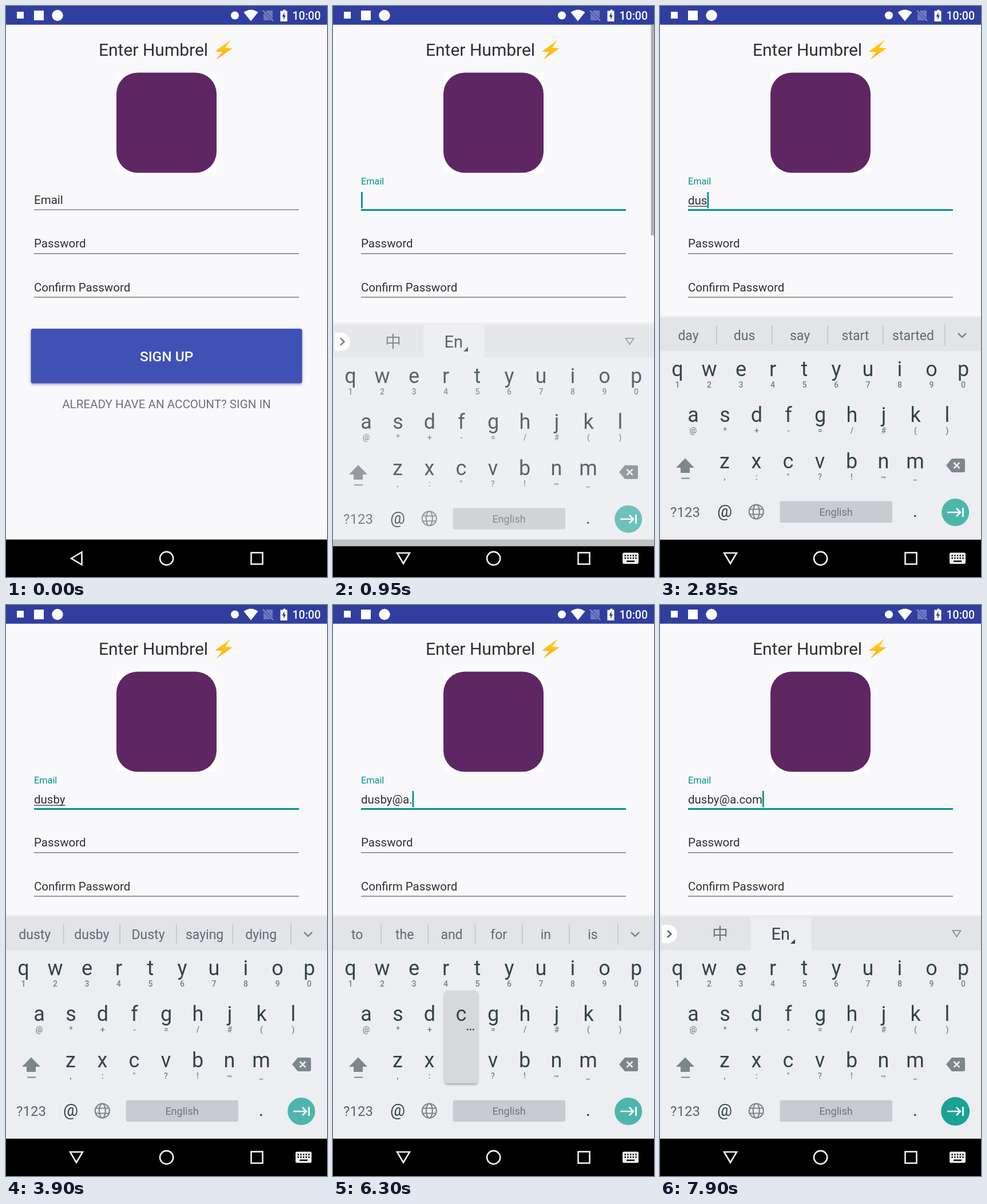
Animation of 561 by 998 pixels, one loop 8 s. Source, as an HTML page:

```html
<!DOCTYPE html>
<html lang="en">
<head>
<meta charset="utf-8">
<title>Sign up form</title>
<style>
html, body { margin: 0; width: 100%; height: 100%; overflow: hidden; background: #f9f8fb; }
svg { display: block; width: 100vw; height: 100vh; font-family: Roboto, "Noto Sans", sans-serif; }
.mid { text-anchor: middle; }
.form { font-size: 20.5px; fill: #303032; }
.key { font-size: 36px; fill: #35444b; text-anchor: middle; }
.sub { font-size: 14px; font-weight: 500; fill: #748087; text-anchor: middle; }
.word { font-size: 23px; fill: #5d6b72; text-anchor: middle; }
.line { fill: none; stroke-width: 2.6; }
</style>
</head>
<body>
<svg id="stage" viewBox="0 0 561 998" preserveAspectRatio="none">
  <defs>
    <filter id="drop" x="-10%" y="-10%" width="120%" height="130%">
      <feDropShadow dx="0" dy="2" stdDeviation="2" flood-opacity=".35"/>
    </filter>
    <linearGradient id="gold" x1="0" y1="0" x2="0" y2="1">
      <stop offset="0" stop-color="#ffd21c"/><stop offset="1" stop-color="#ffac12"/>
    </linearGradient>
    <linearGradient id="edge" x1="0" y1="0" x2="0" y2="1">
      <stop offset="0" stop-opacity="0"/><stop offset="1" stop-opacity=".09"/>
    </linearGradient>
  </defs>
  <rect width="561" height="998" fill="#f9f8fb"/>

  <!-- status bar -->
  <rect width="561" height="32.700" fill="#303f9f"/>
  <g fill="#fff">
    <rect x="19" y="10" width="12" height="12"/>
    <rect x="49" y="8" width="17" height="17"/>
    <circle cx="90" cy="16.500" r="9.700"/>
    <circle cx="400" cy="16.500" r="7"/>
    <path d="M415.500 11Q428 2 440.500 11L428 26.500Z"/>
    <path d="M482 8.500H484.500V6.500H488.500V8.500H491.500V27H479.500V8.500Z"/>
    <text x="550" y="24" font-size="19.500" font-weight="500" text-anchor="end">10:00</text>
  </g>
  <path d="M486.500 11L482.500 18.500H485V24L489 16.500H486.500Z" fill="#303f9f"/>
  <path d="M466 8V25H450V13L455 8Z" fill="#6d78bb"/>
  <path d="M449 8L467 26" stroke="#303f9f" stroke-width="4"/>
  <path d="M449 8L467 26" stroke="#8790c7" stroke-width="2"/>

  <!-- form -->
  <text x="162" y="87" font-size="30" fill="#303032">Enter Humbrel</text>
  <path d="M393 59L365 79.500L378 80.500L367 94L396 74L383 73Z" fill="url(#gold)"/>
  <rect x="193" y="116.500" width="175" height="175" fill="#fff"/>
  <rect x="193" y="116.500" width="175" height="175" rx="37" fill="#5e2764"/>
  <text id="label" x="49">Email</text>
  <rect id="rule" x="49" width="463"/>
  <g class="form">
    <text id="entry" x="49" y="347"></text>
    <text x="49" y="422">Password</text>
    <text x="49" y="499">Confirm Password</text>
  </g>
  <rect id="under" x="49" y="349.500" height="1.300" fill="#303032"/>
  <rect id="caret" y="325" width="2.800" height="28.500" fill="#009688"/>
  <path d="M49 432.700H512M49 509H512" stroke="#7c7b7e" stroke-width="1.400"/>
  <rect x="43.500" y="564" width="474" height="95.500" rx="4" fill="#3f51b5" filter="url(#drop)"/>
  <text class="mid" x="280.700" y="621" font-size="24.500" font-weight="500" fill="#fff">SIGN UP</text>
  <text class="mid" x="280.500" y="703" font-size="20.600" fill="#727174">ALREADY HAVE AN ACCOUNT? SIGN IN</text>
  <rect id="cover" y="546" width="561" height="387" fill="#f9f8fb"/>
  <rect id="bar" x="555.500" y="33" width="5.500" height="368" fill="#b1b0b3"/>
  <rect y="932.500" width="561" height="65.500" fill="#000"/>

  <!-- keyboard -->
  <g id="board">
    <rect y="540" width="561" height="6" fill="url(#edge)"/>
    <rect y="546" width="561" height="386.500" fill="#eceef1"/>
    <rect y="546" width="561" height="57" fill="#e2e4e7"/>
    <g id="tools">
      <rect x="158.500" y="546" width="106" height="57" fill="#eceef1"/>
      <path d="M3 559H14A16 16 0 0 1 14 591H3Z" fill="#fff"/>
      <path class="line" d="M13 569L19.500 575L13 581" stroke="#5a666c"/>
      <text class="mid" x="105" y="585" font-size="28" fill="#667379" style="font-family:'Noto Sans CJK SC','Noto Sans CJK',sans-serif">中</text>
      <text x="194.500" y="585" font-size="29" fill="#35444b">En</text>
      <path d="M236 584V592H228Z" fill="#35444b"/>
      <path d="M511.500 569H525.500L518.500 580Z" fill="none" stroke="#7c868b" stroke-width="1.600"/>
    </g>
    <g id="words"></g>
    <g id="keys"></g>
    <g fill="#7c868b">
      <path d="M44 790.500L60 807H52V816H36V807H28Z"/>
      <rect x="37" y="824.500" width="15" height="2"/>
      <path d="M500 803L510 791H530Q533 791 533 794V812Q533 815 530 815H510Z"/>
    </g>
    <path d="M513.500 798L523.500 808M523.500 798L513.500 808" stroke="#eceef1" stroke-width="2.600"/>
    <text class="mid" x="44" y="893" font-size="24" fill="#59666d">?123</text>
    <g fill="none" stroke="#7c868b" stroke-width="2.200">
      <circle cx="168.300" cy="884" r="12.500"/>
      <ellipse cx="168.300" cy="884" rx="5.500" ry="12.500"/>
      <path d="M157 879.500H180M157 888.500H180"/>
    </g>
    <rect x="209.500" y="865.500" width="196.500" height="37.500" rx="3.500" fill="#c8cbcf"/>
    <text class="mid" x="307.500" y="891" font-size="18" fill="#6c767b">English</text>
    <circle id="enter" cx="516.200" cy="885"/>
    <path class="line" d="M502 885H524M518 878L525 885L518 892M529.500 877V893" stroke="#fff"/>
  </g>
  <g id="pop">
    <rect x="-28.500" y="-41" width="57" height="162" rx="5" fill="#d6d8da" filter="url(#drop)"/>
    <text id="popKey" class="key" y="12"></text>
    <path id="dots" d="M10 27H23" stroke="#35444b" stroke-width="2.400" stroke-dasharray="2.600 2.400"/>
  </g>

  <!-- navigation bar -->
  <g class="line" stroke="#f2f2f2">
    <path id="back" d="M-9 0L9.500 -11V11Z"/>
    <circle cx="280.600" cy="965.500" r="11.600"/>
    <rect x="428.500" y="955.500" width="20" height="20"/>
  </g>
  <g id="imeIcon">
    <rect x="506" y="955.500" width="28" height="19.500" rx="2.500" fill="#f2f2f2"/>
    <path d="M509.500 960.500H531M509.500 965H531" stroke="#000" stroke-width="2.400" stroke-dasharray="2.400 2.300"/>
    <path d="M513 970.500H527" stroke="#000" stroke-width="2.400"/>
  </g>
</svg>
<script>
const LOOP = 8000;
const $ = id => document.getElementById(id);
const set = (el, attrs) => { for (const k in attrs) el.setAttribute(k, attrs[k]); return el; };
const show = (el, on) => el.style.display = on ? '' : 'none';
const add = (parent, tag, attrs, text = '') => {
  const el = set(document.createElementNS('http://www.w3.org/2000/svg', tag), attrs);
  el.textContent = text;
  return parent.appendChild(el);
};
const clamp = v => Math.max(0, Math.min(1, v));
const phase = (t, from, to) => clamp((t - from) / (to - from));
const mix = (a, b, p) => a + (b - a) * p;

// keys: letters, hints, first x, baseline
const STEP = 55.5, ROWS = [
  ['qwertyuiop', '1234567890', 30.5, 647],
  ['asdfghjkl', '@*+-=/#()', 58, 727],
  ['zxcvbnm', ',:"?!~_', 113, 808]
];
const spots = { '@': [113, 888.5], '.': [446, 888.5] };
for (const [letters, hints, x0, y] of ROWS) {
  [...letters].forEach((c, i) => {
    const x = x0 + STEP * i;
    spots[c] = [x, y];
    add($('keys'), 'text', { class: 'key', x, y }, c);
    add($('keys'), 'text', { class: 'sub', x, y: y + 20 }, hints[i]);
  });
}
for (const [c, size] of [['@', 29], ['.', 32]])
  add($('keys'), 'text', { class: 'key', x: spots[c][0], y: 893, style: `font-size:${size}px` }, c);

// key, press, text commit, release
const TAPS = [
  ['d', 2150, 2200, 2300], ['u', 2500, 2600, 2650], ['s', 2700, 2800, 2850],
  ['b', 3050, 3200, 3250], ['y', 3300, 3400, 3500], ['@', 4600, 4700, 4800],
  ['a', 5600, 5700, 5800], ['.', 6050, 6200, 6250], ['c', 6300, 6400, 6450],
  ['o', 6500, 6600, 6650], ['m', 6700, 6800, 6950]
];
// start, cell width, suggestions (none: tool strip)
const STRIPS = [
  [0, 0, ''], [2250, 97, 'do day did down does'], [2600, 97, 'due du dust during duty'],
  [2800, 97, 'day dus say start started'], [3200, 98.6, 'dust dusb Dusty busy days'],
  [3400, 98.6, 'dusty dusby Dusty saying dying'], [4700, 0, ''],
  [6200, 82.2, 'to the and for in is'], [6400, 0, '']
];
const CARET = [[800, 1250], [1750, 3900], [4400, 5150], [5600, 7350], [7850, LOOP]];

let strip;
function drawStrip(next) {
  if (next === strip) return;
  strip = next;
  const [, cell, list] = strip, box = $('words');
  box.replaceChildren();
  show($('tools'), !list);
  if (!list) return;
  const words = list.split(' ');
  let left = 0;
  words.forEach((w, i) => {
    const right = i < words.length - 1 ? 2 + cell * (i + 1) : 498;
    const last = right === 498;
    add(box, 'text', { class: 'word', x: (left + right) / 2 - (last ? 1.5 : 0), y: 584 }, w);
    add(box, 'path', { d: `M${right} ${last ? 556 : 558}V${last ? 594 : 592}`, stroke: '#c0c5c8', 'stroke-width': 1.6 });
    left = right;
  });
  add(box, 'path', { class: 'line', d: 'M521 572L528 579L535 572', stroke: '#7c868b' });
}

function render(t) {
  // field focus
  const focus = t >= 750, lift = phase(t, 750, 930);
  set($('label'), { y: mix(346, 312, lift), 'font-size': mix(20.5, 16.3, lift), fill: focus ? '#009688' : '#303032' });
  set($('rule'), focus ? { y: 355, height: 3, fill: '#009688' } : { y: 355.3, height: 1.4, fill: '#7c7b7e' });

  // keyboard entry
  const up = t >= 850, rise = phase(t, 850, 1080);
  show($('board'), up);
  show($('cover'), up);
  show($('imeIcon'), up);
  set($('board'), { transform: `translate(0 ${66.5 * (1 - rise) ** 3})`, opacity: clamp(rise * 1.85) });
  set($('back'), { transform: `translate(123 965.500) rotate(${up ? -90 : 0})` });
  show($('bar'), up);
  set($('bar'), { opacity: 1 - phase(t, 1580, 1830) });

  // typing
  const text = TAPS.filter(k => t >= k[2]).map(k => k[0]).join('');
  const entry = $('entry');
  if (entry.textContent !== text) entry.textContent = text;
  const width = text ? entry.getComputedTextLength() : 0;
  set($('under'), { width: text.includes('@') ? 0 : width });
  set($('caret'), { x: 49 + width });
  show($('caret'), CARET.some(([a, b]) => t >= a && t < b));
  drawStrip(STRIPS.filter(s => t >= s[0]).pop());

  const tap = TAPS.find(k => t >= k[1] && t < k[3]);
  show($('pop'), !!tap);
  if (tap) {
    const [x, y] = spots[tap[0]];
    set($('pop'), { transform: `translate(${x} ${y - 93})` });
    $('popKey').textContent = tap[0];
    show($('dots'), /[a-z]/.test(tap[0]));
  }
  const pressed = t >= 7850;
  set($('enter'), { r: pressed ? 25 : 24, fill: pressed ? '#1ba294' : '#4db6ac' });
}

const start = performance.now();
function tick() {
  render((performance.now() - start) % LOOP);
  requestAnimationFrame(tick);
}
tick();
</script>
</body>
</html>
```
